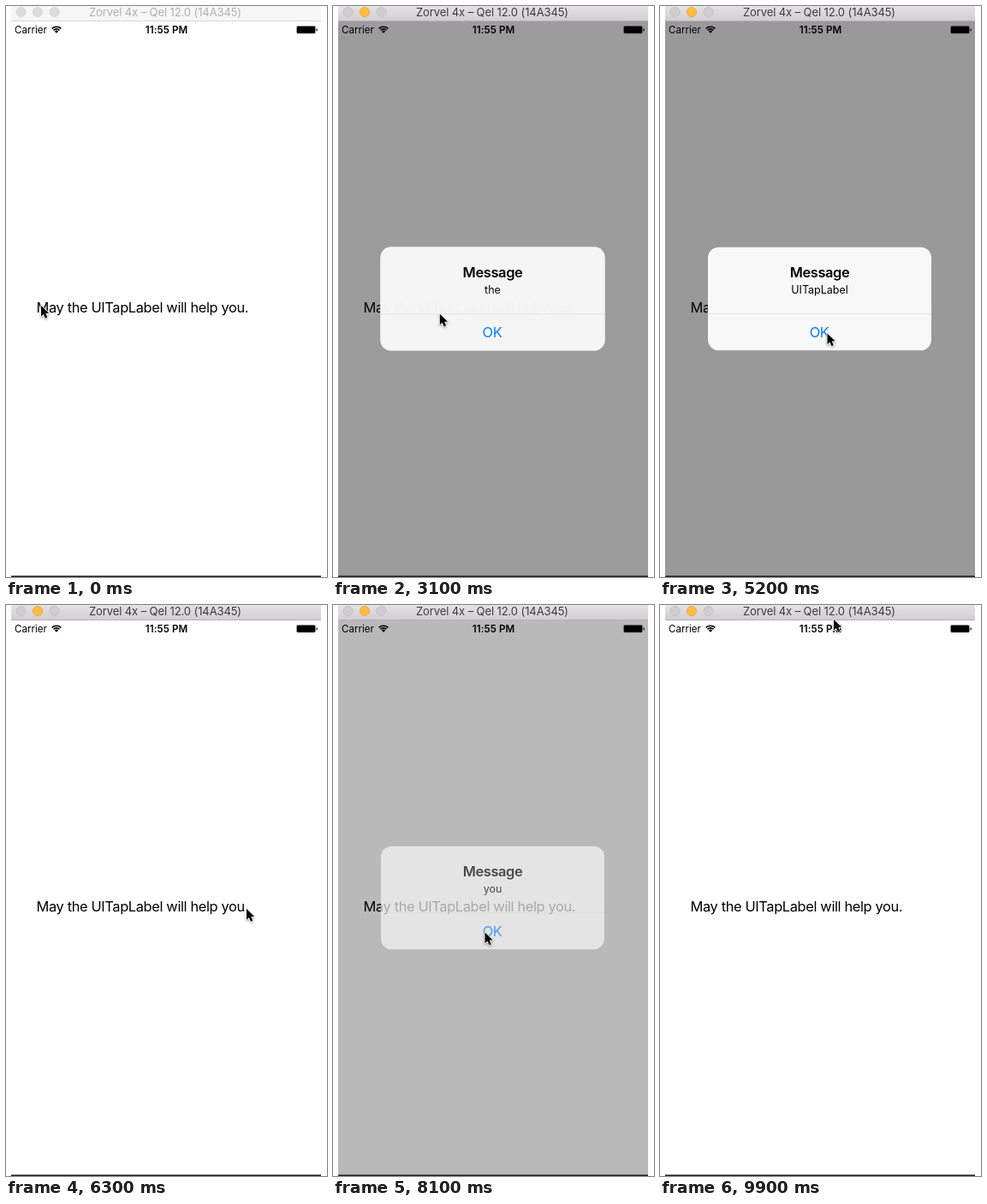
Recreate the animation shown at these times as an HTML page with a canvas. Size 375x667 px, loop 10000 ms.

```html
<!DOCTYPE html>
<html lang="en">
<head>
<meta charset="utf-8">
<title>Tap label</title>
<style>
html, body { margin: 0; width: 100%; height: 100%; overflow: hidden; background: #fff; }
canvas { display: block; width: 375px; height: 667px; }
</style>
</head>
<body>
<canvas id="stage"></canvas>
<script>
const W = 375, H = 667, LOOP = 10000, STEP = 100;
const CX = 186.5, CY = 342;
const FADE = 400, ACTIVE_FROM = 300;
const FAMILY = 'Inter, Roboto, sans-serif';

const canvas = document.getElementById('stage');
const ctx = canvas.getContext('2d');
const ratio = window.devicePixelRatio || 1;
canvas.width = W * ratio;
canvas.height = H * ratio;

const alerts = [
  { word: 'May', tap: [41, 350], open: 640, close: 1780 },
  { word: 'the', tap: [107, 352], open: 2740, close: 3425 },
  { word: 'UITapLabel', tap: [140, 352], open: 4440, close: 5225 },
  { word: 'you', tap: [273, 351], open: 7345, close: 7950 },
  { word: 'help', tap: [230, 353], open: 8645, close: 9250 }
];

// The pointer rests on each word while its alert opens, then on OK while it closes.
const path = alerts.flatMap(({ tap, open, close }, i) => {
  const ok = [CX + (i % 2 ? -9 : 9), 382.5];
  return [[open - 100, ...tap], [open + 250, ...tap], [close - 100, ...ok], [close + 330, ...ok]];
});
path.push([6300, 281, 355], [9900, 203, 17]);
path.sort((a, b) => a[0] - b[0]);

const clamp = x => Math.min(1, Math.max(0, x));
const ease = x => { x = clamp(x); return x * x * (3 - 2 * x); };
const mix = (a, b, k) => a + (b - a) * k;

function rect(x, y, w, h, fill) {
  ctx.fillStyle = fill;
  ctx.fillRect(x, y, w, h);
}

function round(x, y, w, h, r, fill) {
  ctx.beginPath();
  ctx.roundRect(x, y, w, h, r);
  ctx.fillStyle = fill;
  ctx.fill();
}

function text(str, x, y, size, opt = {}) {
  ctx.font = `${opt.weight || 400} ${size}px ${FAMILY}`;
  ctx.letterSpacing = (opt.track || 0) + 'px';
  ctx.textAlign = opt.align || 'center';
  ctx.fillStyle = opt.fill || '#000';
  ctx.fillText(str, x, y);
}

function titleBar(active) {
  const shade = ctx.createLinearGradient(0, 0, 0, 17);
  shade.addColorStop(0, active ? '#e5e2e5' : '#f6f6f6');
  shade.addColorStop(1, active ? '#d1ced1' : '#f6f6f6');
  rect(6, 0, 362, 17, shade);
  rect(6, 17, 362, 1, active ? '#b4b0b4' : '#d6d6d6');
  for (let i = 0; i < 3; i++) {
    const lit = active && i === 1;
    ctx.beginPath();
    ctx.arc(17.5 + 19.5 * i, 7, 5.6, 0, Math.PI * 2);
    ctx.fillStyle = lit ? '#fdbc40' : active ? '#d0cdd0' : '#dcdcdc';
    ctx.fill();
    ctx.lineWidth = 0.7;
    ctx.strokeStyle = lit ? '#e0a135' : active ? '#bcb9bc' : '#cfcfcf';
    ctx.stroke();
  }
  text('Zorvel 4x – Qel 12.0 (14A345)', 186, 12, 13,
    { track: -0.1, fill: active ? '#3c3a3c' : '#b0b0b0' });
}

function wifi(x, y) {
  const from = -Math.PI * 0.75, to = -Math.PI * 0.25;
  ctx.strokeStyle = ctx.fillStyle = '#000';
  ctx.lineWidth = 1.6;
  for (const r of [4.9, 7.6]) {
    ctx.beginPath();
    ctx.arc(x, y, r, from, to);
    ctx.stroke();
  }
  ctx.beginPath();
  ctx.moveTo(x, y);
  ctx.arc(x, y, 3, from, to);
  ctx.fill();
}

function battery() {
  round(339, 23, 23, 9.5, 2, '#aaa');
  round(339.9, 23.8, 21.2, 8, 1.2, '#000');
  round(362.4, 26.2, 1.4, 3.2, 0.7, '#333');
}

function screen() {
  text('Carrier', 10, 32, 11.6, { align: 'left' });
  wifi(59, 31.8);
  text('11:55 PM', 187.5, 32, 11.6, { weight: 600, track: 0.1 });
  battery();
  text('May the UITapLabel will help you.', 35.5, 357.5, 16.4, { align: 'left', track: -0.36 });
}

function alertBox(word, alpha, scale) {
  ctx.save();
  ctx.globalAlpha = 0.4 * alpha;
  rect(6, 18, 362, 648, '#000');
  ctx.globalAlpha = alpha;
  ctx.translate(CX, CY);
  ctx.scale(scale, scale);
  round(-130.5, -60.3, 261, 120.6, 12.5, '#f8f8f8');
  rect(-130.5, 17.4, 261, 0.6, '#d6d6da');
  text('Message', 0, -25.2, 16.4, { weight: 600, track: -0.4 });
  text(word, 0, -6, 12.5);
  text('OK', -0.5, 45, 16.4, { track: -0.4, fill: '#007aff' });
  ctx.restore();
}

function pointer(x, y) {
  ctx.save();
  ctx.translate(x, y);
  ctx.scale(0.96, 0.96);
  const arrow = new Path2D('M0 0V13.2L3 10.4L5.2 15.3L7.6 14.2L5.5 9.5H9.6Z');
  ctx.lineJoin = 'round';
  ctx.lineWidth = 1.6;
  ctx.strokeStyle = '#fff';
  ctx.shadowColor = 'rgba(0,0,0,.4)';
  ctx.shadowBlur = 2.5 * ratio;
  ctx.shadowOffsetY = ratio;
  ctx.stroke(arrow);
  ctx.shadowColor = 'transparent';
  ctx.fillStyle = '#000';
  ctx.fill(arrow);
  ctx.restore();
}

function pointerAt(t) {
  const next = path.findIndex(stop => stop[0] > t);
  if (next < 1) return path.at(next).slice(1);
  const [ta, xa, ya] = path[next - 1], [tb, xb, yb] = path[next];
  const k = ease((t - ta) / (tb - ta));
  return [mix(xa, xb, k), mix(ya, yb, k)];
}

function draw(t) {
  ctx.setTransform(ratio, 0, 0, ratio, 0, 0);
  rect(0, 0, W, H, '#fff');
  screen();
  for (const { word, open, close } of alerts) {
    const shown = ease((t - open) / FADE);
    const alpha = Math.min(shown, 1 - ease((t - close) / FADE));
    if (alpha > 0) alertBox(word, alpha, mix(1.215, 1, shown));
  }
  titleBar(t >= ACTIVE_FROM);
  rect(6, 665.5, 362, 1.5, '#1c1c1c');
  pointer(...pointerAt(t));
}

const start = performance.now();
function tick() {
  const t = (performance.now() - start) % LOOP;
  draw(Math.floor(t / STEP) * STEP);
  requestAnimationFrame(tick);
}
tick();
</script>
</body>
</html>
```
